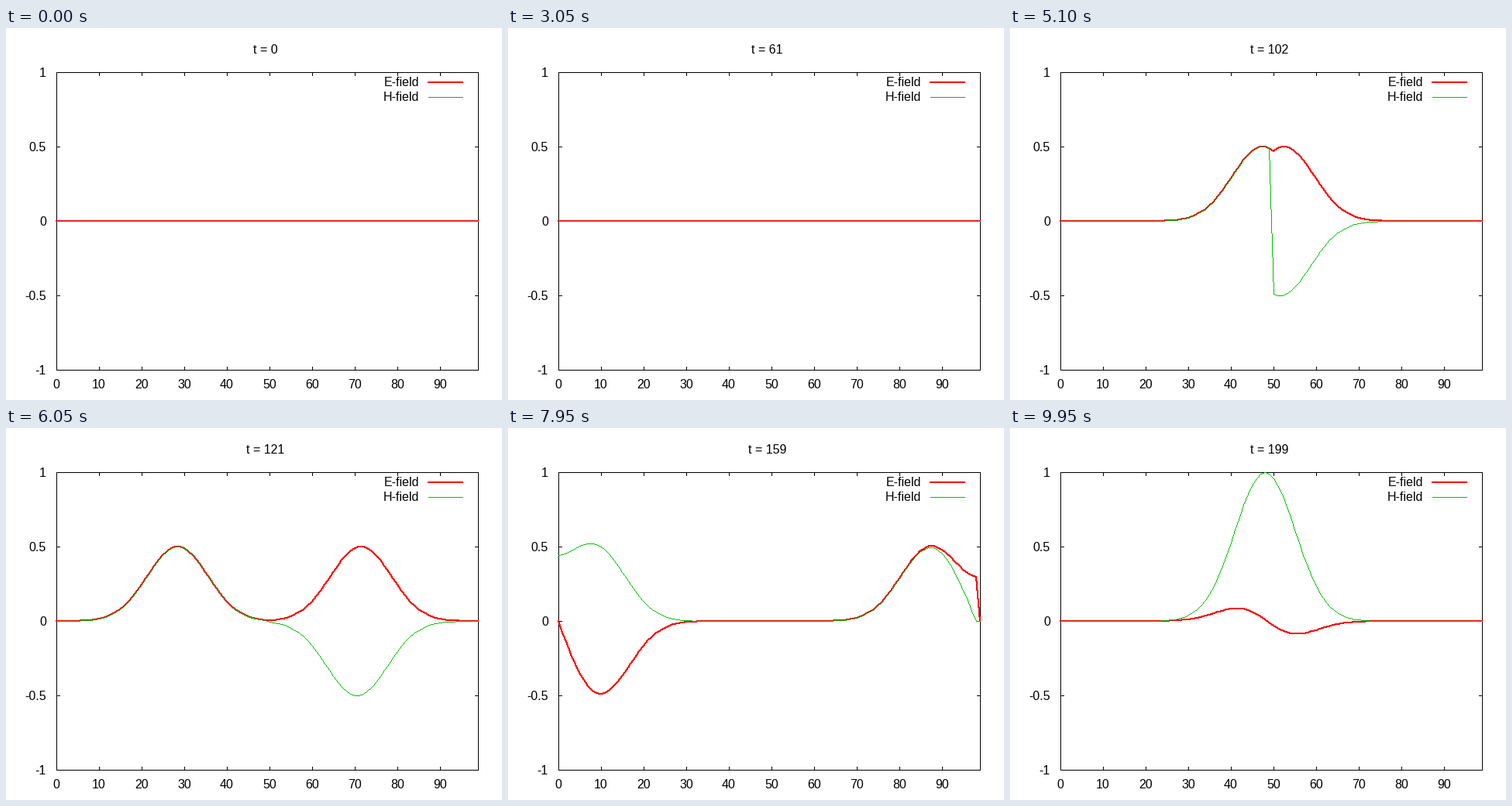
Recreate the animation shown at these times as a matplotlib script. Size 640 px wide and 480 px high, loop 10 s.

```python
import numpy as np
import matplotlib.pyplot as plt
from matplotlib.animation import FuncAnimation
from matplotlib.patches import PathPatch
from matplotlib.path import Path
from matplotlib.transforms import IdentityTransform

W, H = 640, 480
LEFT, RIGHT, TOP, BOTTOM = 65, 609, 57, 441
CELLS, SOURCE, STEPS = 100, 50, 200
RED, GREEN, GREY = "#ff0000", "#00c000", "#707070"

plt.rcParams.update({
    "font.family": "Liberation Sans",
    "font.size": 11.52,  # 16 px at 100 dpi
    "path.snap": False,
})


def simulate():
    """1D FDTD at the magic time step with an additive Gaussian source."""
    e, h = np.zeros(CELLS), np.zeros(CELLS)
    states = []
    for t in range(STEPS):
        h[:-2] += e[1:-1] - e[:-2]
        e[1:-1] += h[1:-1] - h[:-2]
        e[SOURCE] += np.exp(-(t - 100) ** 2 / 100)
        states.append((e.copy(), h.copy()))
    return states


def to_x(k):
    return np.floor(LEFT + (RIGHT - LEFT) * np.asarray(k) / (CELLS - 1) + 0.5)


def to_y(v):
    mid = (TOP + BOTTOM) / 2
    return np.floor(mid - (BOTTOM - TOP) / 2 * np.asarray(v) + 0.5)


def stepped(xs, ys, brush=1):
    """Path of a polyline stamped pixel by pixel with a square brush."""
    runs = np.maximum(np.abs(np.diff(xs)), np.abs(np.diff(ys)))
    ends = np.concatenate([[0], np.cumsum(runs)])
    walk = np.arange(ends[-1] + 1)
    px = np.floor(np.interp(walk, ends, xs) + 0.5)
    py = np.floor(np.interp(walk, ends, ys) + 0.5)
    x0, x1 = px + 1 - brush, px + 1
    y0, y1 = H - py - 1, H - py - 1 + brush
    corners = [(x0, y0), (x1, y0), (x1, y1), (x0, y1)]
    return Path.make_compound_path_from_polys(
        np.array(corners).transpose(2, 0, 1))


fig = plt.figure(figsize=(W / 100, H / 100), dpi=100, facecolor="white")


def line(xs, ys, color="black", brush=1, z=1):
    return fig.add_artist(PathPatch(
        stepped(xs, ys, brush), facecolor=color, edgecolor="none", lw=0,
        antialiased=False, zorder=z, transform=IdentityTransform()))


def label(x, base, text, ha):
    return fig.text(x, H - base, text, ha=ha, va="baseline",
                    transform=IdentityTransform(), zorder=5)


line([LEFT, RIGHT, RIGHT, LEFT, LEFT], [TOP, TOP, BOTTOM, BOTTOM, TOP])
for k in range(0, CELLS, 10):
    x = to_x(k)
    line([x, x], [BOTTOM, BOTTOM - 4])
    line([x, x], [TOP, TOP + 4])
    label(x, 465, str(k), "center")
for v in (-1, -0.5, 0, 0.5, 1):
    y = to_y(v)
    line([LEFT, LEFT + 4], [y, y])
    line([RIGHT, RIGHT - 4], [y, y])
    label(52, y + 6, f"{v:g}", "right")

label(533, 75, "E-field", "right")
label(533, 94, "H-field", "right")
line([545, 589], [70, 70], RED, 2)
h_key = line([545, 589], [89, 89], GREEN)

states = simulate()
xs = to_x(np.arange(CELLS))
e_line = line(xs, to_y(0 * xs), RED, 2, z=2)
h_line = line(xs, to_y(0 * xs), GREEN, z=3)
title = label(334.5, 33, "t = 0", "center")


def draw(t):
    e, h = states[t]
    e_line.set_path(stepped(xs, to_y(e), 2))
    h_line.set_path(stepped(xs, to_y(h)))
    color = GREEN if np.abs(h).max() > 0.006 else GREY
    h_line.set_facecolor(color)
    h_key.set_facecolor(color)
    title.set_text(f"t = {t}")
    return e_line, h_line, h_key, title


anim = FuncAnimation(fig, draw, frames=STEPS, interval=50, repeat=True,
                     repeat_delay=0, blit=False)
plt.show()
```
